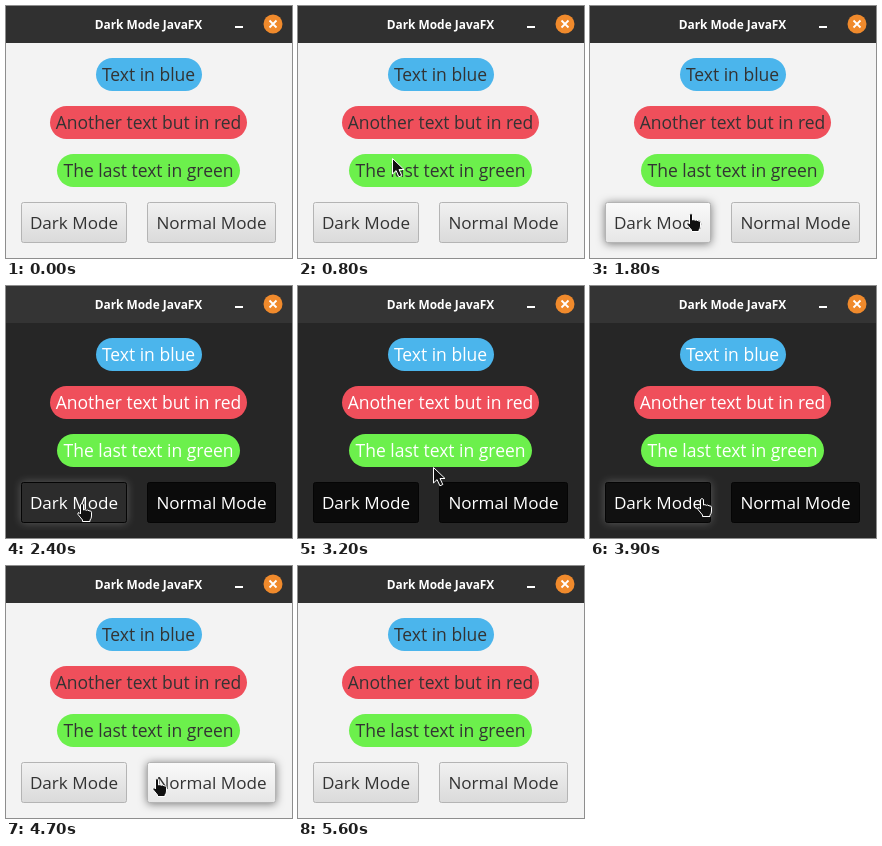
Animation of 286x252 px, one loop 7.1 s. Source, as an HTML page:

```html
<!DOCTYPE html>
<html lang="en">
<head>
<meta charset="utf-8">
<title>Dark Mode JavaFX</title>
<style>
  html, body { margin: 0; width: 100%; height: 100%; overflow: hidden; }
  svg { display: block; width: 286px; height: 252px; font: 17.5px "Open Sans", "Noto Sans", sans-serif; text-anchor: middle; }
  .page { fill: #f3f3f3; }
  .bar { fill: #303030; }
  .title { font-size: 11.9px; font-weight: 700; fill: #fff; }
  .ink { fill: #333; }
  .button rect { fill: url(#light); stroke: #b4b4b4; }
  .button text { font-size: 17.1px; }
  .button.hover rect { fill: url(#lit); filter: drop-shadow(0 1px 4px rgba(0, 0, 0, .5)); }
  .dark .page { fill: #262626; }
  .dark .bar { fill: #343434; }
  .dark .ink { fill: #fff; }
  .dark .button rect { fill: #0b0b0b; stroke: #050505; }
  .dark .button.hover rect { fill: #111; filter: drop-shadow(0 0 4px rgba(255, 255, 255, .25)); }
  .dark .button.pressed rect { fill: #2c2c2c; }
  .pointer { fill: #111; stroke: #fff; stroke-linejoin: round; }
</style>
</head>
<body>
<svg id="stage" viewBox="0 0 286 252">
  <defs>
    <linearGradient id="light" x2="0" y2="1"><stop stop-color="#f1f1f1"/><stop offset="1" stop-color="#dadada"/></linearGradient>
    <linearGradient id="lit" x2="0" y2="1"><stop stop-color="#fafafa"/><stop offset="1" stop-color="#e6e6e6"/></linearGradient>
  </defs>

  <rect class="page" width="286" height="252"/>
  <rect class="bar" width="286" height="37"/>
  <text class="title" x="142.5" y="23">Dark Mode JavaFX</text>
  <rect x="229" y="20" width="8" height="2" fill="#fff"/>
  <circle cx="267" cy="18" r="9.5" fill="#f08a2c"/>
  <path d="M263.5 14.5l7 7m0-7l-7 7" stroke="#fff" stroke-width="1.8"/>

  <g id="content"></g>

  <g id="pointer" class="pointer">
    <path id="arrow" d="M.5 .5V16l3.6-3.4 2.8 6.2 2.9-1.3-2.8-6H12z"/>
    <path id="hand" d="M-1.5 1.5q1.5-2 3 0V7q1.5-1 2.8.3 1.5-.8 2.7.5 2-.4 2.5 1.4V13q0 2.5-1.5 4v1.5H.5V17L-4 11.5q-.5-2 1-2l1.5 1.5z"/>
  </g>
</svg>
<script>
  const LOOP = 7100, STEP = 100, CENTER = 142.5;
  const BUTTON_TOP = 196, BUTTON_HEIGHT = 41;
  const $ = id => document.getElementById(id);

  const labels = [
    { text: "Text in blue", color: "#4bb5ec", width: 106 },
    { text: "Another text but in red", color: "#ef4f5b", width: 197 },
    { text: "The last text in green", color: "#6cf04c", width: 183 }
  ];
  const buttons = [
    { text: "Dark Mode", left: 15, width: 106 },
    { text: "Normal Mode", left: 141, width: 129 }
  ];

  // Where the pointer is heading: time, x, y
  const stops = [
    [100, 250, 13], [800, 94, 152], [1300, 165, 212], [1800, 101, 207], [2200, 76, 217],
    [2600, 76, 217], [3200, 135, 181], [3800, 110, 212], [4500, 151, 212]
  ];

  const caption = (text, x, y) => `<text class="ink" x="${x}" y="${y}">${text}</text>`;

  const pill = ({ text, color, width }, row) => {
    const top = 52 + 48 * row, left = Math.ceil(CENTER - width / 2);
    return `<rect x="${left}" y="${top}" width="${width}" height="33" rx="16.5" fill="${color}"/>`
      + caption(text, CENTER, top + 23);
  };

  const button = ({ text, left, width }) =>
    `<g class="button"><rect x="${left + .5}" y="${BUTTON_TOP + .5}" width="${width - 1}" height="${BUTTON_HEIGHT - 1}" rx="2"/>`
    + caption(text, left + width / 2, BUTTON_TOP + 27) + "</g>";

  $("content").innerHTML = labels.map(pill).join("") + buttons.map(button).join("");
  const buttonNodes = [...document.querySelectorAll(".button")];

  const ease = k => k * k * (3 - 2 * k);

  function pointerAt(t) {
    const i = stops.findIndex(stop => stop[0] > t);
    if (i < 0) return stops.at(-1).slice(1);
    if (i === 0) return stops[0].slice(1);
    const [t0, ...from] = stops[i - 1], [t1, ...to] = stops[i];
    const k = ease((t - t0) / (t1 - t0));
    return from.map((v, axis) => Math.round(v + (to[axis] - v) * k));
  }

  function draw() {
    const t = Math.floor(performance.now() % LOOP / STEP) * STEP;
    const visible = t >= 100 && t < 4900;
    const dark = t >= 2400 && t < 4700;
    const pressed = t >= 2400 && t < 2500;
    const [x, y] = pointerAt(t);
    const inRow = visible && y >= BUTTON_TOP && y < BUTTON_TOP + BUTTON_HEIGHT;
    const over = inRow ? buttons.findIndex(b => x >= b.left && x < b.left + b.width) : -1;

    $("stage").classList.toggle("dark", dark);
    buttonNodes.forEach((node, i) => {
      node.classList.toggle("hover", i === over);
      node.classList.toggle("pressed", pressed && i === over);
    });
    $("pointer").style.display = visible ? "" : "none";
    $("pointer").setAttribute("transform", `translate(${x} ${y})`);
    $("arrow").style.display = over < 0 ? "" : "none";
    $("hand").style.display = over < 0 ? "none" : "";
    requestAnimationFrame(draw);
  }
  draw();
</script>
</body>
</html>
```
